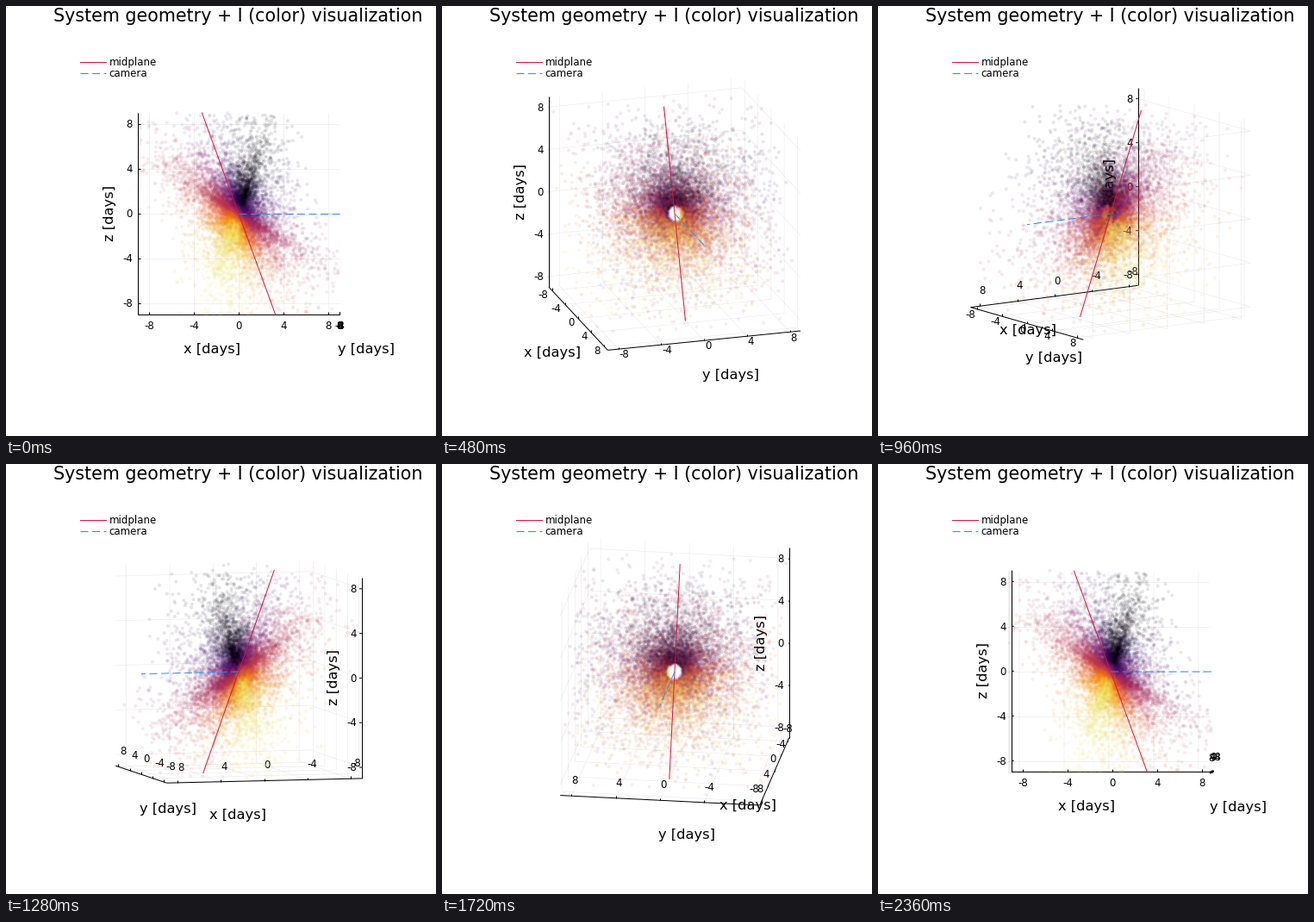
A matplotlib script for the animation above (2400 ms loop, 499x499 px).

```python
import numpy as np
import matplotlib.pyplot as plt
from matplotlib.animation import FuncAnimation
from matplotlib.collections import LineCollection

SIZE, FRAMES = 499, 60
PX = 0.72                     # points per pixel at 100 dpi
CX, CY, SCALE, LIM = 270, 241, 13, 9
TICKS = (-8, -4, 0, 4, 8)
TICK_PX, GUIDE_PX, TITLE_PX = 11.8, 16.2, 20.7
TILT, OPENING = np.radians(20), np.radians(40)

# axis index -> (start, end) of the drawn edge
EDGES = {
    0: ((-LIM, -LIM, -LIM), (LIM, -LIM, -LIM)),
    1: ((LIM, -LIM, -LIM), (LIM, LIM, -LIM)),
    2: ((-LIM, -LIM, -LIM), (-LIM, -LIM, LIM)),
}
GUIDE_SHIFT = ((-30.5, 40), (31, 40), (-32.3, -0.5))


def make_clouds(count=12500):
    """Thick tilted disc of clouds: dark at the top front, bright at the bottom back."""
    rng = np.random.default_rng(7)
    r = 0.9 + rng.exponential(3.2, count)
    phi = rng.uniform(0, 2 * np.pi, count)
    open_cos = np.cos(OPENING)
    tilt = np.arccos(open_cos + (1 - open_cos) * rng.random(count) ** 5)
    front = np.sin(tilt) * np.sin(rng.uniform(0, 2 * np.pi, count))
    flat = np.sqrt(1 - front ** 2)
    rise = np.cos(phi) * flat
    c, s = np.cos(TILT), np.sin(TILT)
    points = r[:, None] * np.column_stack((front * c - rise * s,
                                           np.sin(phi) * flat,
                                           front * s + rise * c))
    side = np.clip(1.4 * front / np.sin(OPENING), -1, 1)
    level = np.clip(0.48 - 0.27 * np.cos(phi) - 0.26 * side, 0, 0.95)
    inside = np.all(np.abs(points) < LIM, axis=1)
    return points[inside], plt.get_cmap("inferno")(level[inside], alpha=0.1)


def project(points, az, el):
    x, y, z = np.moveaxis(np.asarray(points, float), -1, 0)
    depth = y * np.cos(az) - x * np.sin(az)
    sx = x * np.cos(az) + y * np.sin(az)
    sy = depth * np.sin(el) + z * np.cos(el)
    return np.stack((CX + SCALE * sx, CY - SCALE * sy), axis=-1)


def grid_lines():
    a, b = -LIM, LIM
    lines = []
    for t in TICKS:
        lines.append([(t, a, a), (t, b, a), (t, b, b)])
        lines.append([(b, t, a), (a, t, a), (a, t, b)])
        lines.append([(a, a, t), (a, b, t), (b, b, t)])
    return np.array(lines)


def tick_point(axis, t):
    p = list(EDGES[axis][0])
    p[axis] = t
    return p


def tick_marks():
    marks = []
    for axis in range(3):
        for t in TICKS:
            p = tick_point(axis, t)
            q = list(p)
            q[0 if axis == 2 else 2] += 0.216
            marks.append((p, q))
    return np.array(marks)


def label_offset(theta, width):
    """Shift of a tick label's centre from its tick, y downwards."""
    normal = np.radians(theta - 90)
    dx, rise = 6 * np.cos(normal), 6 * np.sin(normal)
    if theta == 0:
        return dx, -rise + 6.5
    if theta == 270:
        return dx - width / 2, 0
    side = -1 if theta > 270 else 1
    if 90 <= theta < 270:
        rise += 12.5
    return dx + side * width / 2, -rise


fig = plt.figure(figsize=(SIZE / 100, SIZE / 100), dpi=100, facecolor="white")
ax = fig.add_axes([0, 0, 1, 1])
ax.set_xlim(0, SIZE)
ax.set_ylim(SIZE, 0)
ax.axis("off")


def text(x, y, s, px, **kw):
    return ax.text(x, y, s, fontsize=px * PX, color="black",
                   family="DejaVu Sans", zorder=3, **kw)


text(269.6, 18, "System geometry + I (color) visualization", TITLE_PX,
     ha="center", va="baseline")

RED = dict(color="crimson", lw=PX, zorder=5)
BLUE = dict(color="dodgerblue", lw=PX, zorder=5, dashes=(9, 4.5),
            dash_capstyle="butt")
for y, name, style in ((65, "midplane", RED), (78, "camera", BLUE)):
    ax.plot([86, 116], [y, y], **style)
    text(119.5, y + 4.2, name, TICK_PX, ha="left", va="baseline")

points, colors = make_clouds()
GRID, MARKS = grid_lines(), tick_marks()
AXES = np.array([EDGES[i] for i in range(3)])
PLANE = LIM * np.array([(-np.tan(TILT), 0, 1), (np.tan(TILT), 0, -1)])
SIGHT = np.array([(0, 0, 0), (LIM, 0, 0)])

grid = LineCollection([], colors=[(0, 0, 0, 0.1)], linewidths=0.36, zorder=1)
axes = LineCollection([], colors="black", linewidths=PX, zorder=2)
marks = LineCollection([], colors="black", linewidths=PX, zorder=2)
for lines in (grid, axes, marks):
    ax.add_collection(lines, autolim=False)
cloud = ax.scatter(points[:, 0], points[:, 2], s=8.3, c=colors,
                   linewidths=0, zorder=4)
plane, = ax.plot([], [], **RED)
sight, = ax.plot([], [], **BLUE)
labels = [[text(0, 0, str(t), TICK_PX, ha="center", va="baseline")
           for t in TICKS] for _ in range(3)]
guides = [text(0, 0, f"{name} [days]", GUIDE_PX, ha="center", va="center",
               rotation=90 if name == "z" else 0) for name in "xyz"]


def draw(frame):
    az = np.radians(359 * frame / (FRAMES - 1))
    el = np.radians(20 * np.sin(az))

    grid.set_segments(project(GRID, az, el))
    edges = project(AXES, az, el)
    axes.set_segments(edges)
    marks.set_segments(project(MARKS, az, el))
    cloud.set_offsets(project(points, az, el))
    plane.set_data(*project(PLANE, az, el).T)
    sight.set_data(*project(SIGHT, az, el).T)

    for axis, (start, end) in enumerate(edges):
        dx, dy = end - start
        theta = 270 if axis == 2 else round(np.degrees(np.arctan2(-dy, dx))) % 360
        for t, label in zip(TICKS, labels[axis]):
            x, y = project(tick_point(axis, t), az, el)
            width = 7.5 + (4.3 if t < 0 else 0)
            ox, oy = label_offset(theta, width)
            label.set_position((x + ox, y + oy + 4.3))
        guides[axis].set_position((start + end) / 2 + GUIDE_SHIFT[axis])
    return []


anim = FuncAnimation(fig, draw, frames=FRAMES, interval=40, repeat=True,
                     repeat_delay=0, blit=False)
plt.show()
```
